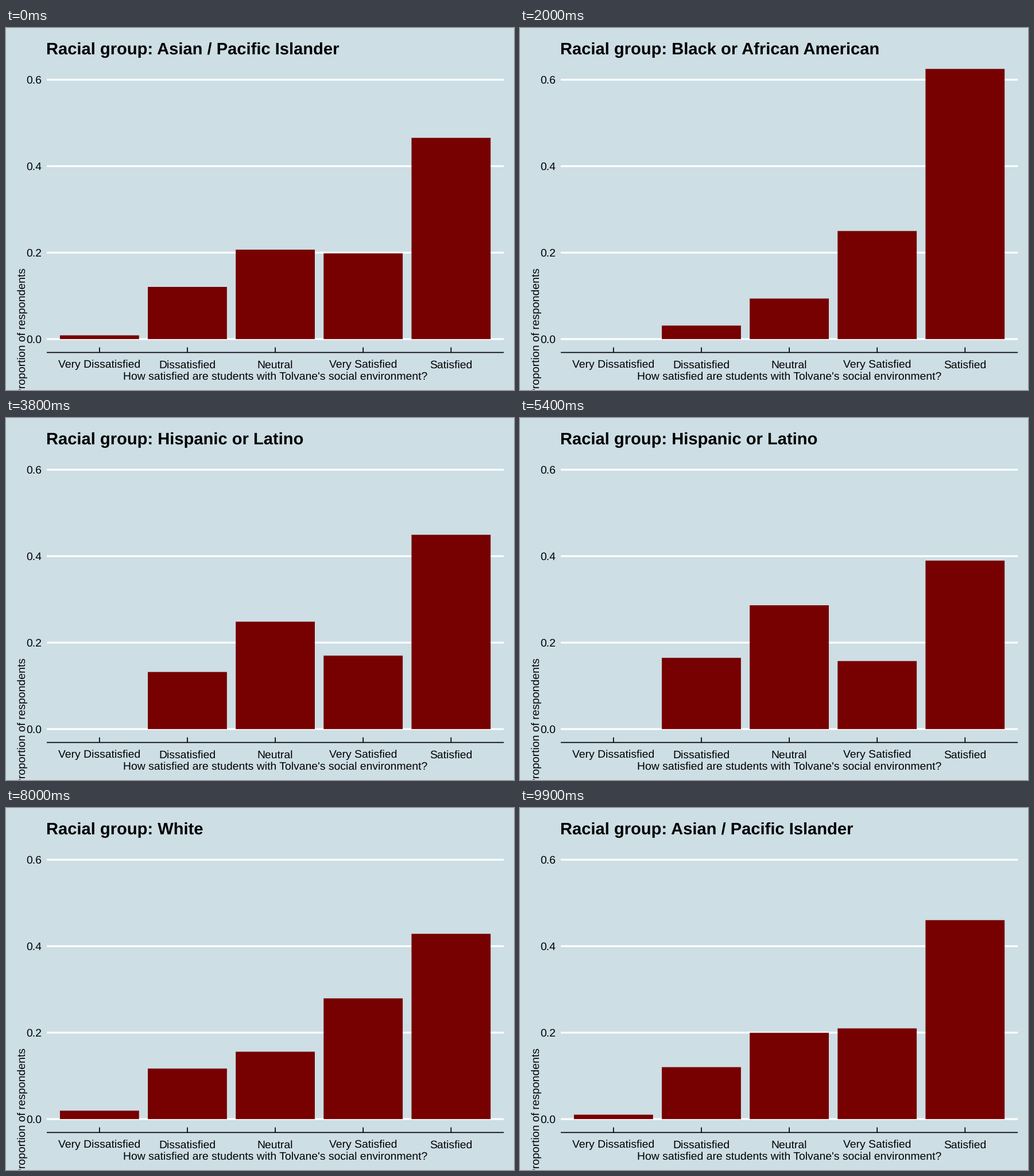
These frames come from a looping animation (885x632 px, 10 s). A matplotlib script:

```python
import matplotlib.pyplot as plt
import numpy as np
from matplotlib.animation import FuncAnimation
from matplotlib.patches import Rectangle

W, H, DPI = 885, 632, 64
SKY, RED = "#cddee5", "#770000"

LEFT, RIGHT = 71, 867.2
ZERO, UNIT = 543.1, 754.7          # pixel row of 0.0, pixels per 1.0
FLOOR = 566.5
STEP = (RIGHT - LEFT) / 5.2
CENTERS = LEFT + STEP * (0.6 + np.arange(5))

ANSWERS = ["Very Dissatisfied", "Dissatisfied", "Neutral",
           "Very Satisfied", "Satisfied"]
GROUPS = ["Asian / Pacific Islander", "Black or African American",
          "Hispanic or Latino", "Other", "White"]
COUNTS = np.array([
    [1, 14, 24, 23, 54],
    [0, 1, 3, 8, 20],
    [0, 5, 9, 4, 11],
    [1, 10, 12, 23, 38],
    [3, 18, 24, 43, 66],
])
SHARES = COUNTS / COUNTS.sum(axis=1, keepdims=True)

PER_GROUP, LAST_HOLD, MOVES = 20, 13, 7

plt.rcParams["font.family"] = "Liberation Sans"
plt.rcParams["text.hinting"] = "none"

fig = plt.figure(figsize=(W / DPI, H / DPI), dpi=DPI, facecolor=SKY)
ax = fig.add_axes([0, 0, 1, 1])
ax.set_xlim(0, W)
ax.set_ylim(H, 0)
ax.axis("off")


def pt(px):
    return px * 72 / DPI


def line(x, y, color, width, z):
    ax.plot(x, y, color=color, lw=pt(width), solid_capstyle="butt",
            snap=False, zorder=z)


def label(x, y, text, ha="center", size=19.4, **kw):
    return ax.text(x, y, text, ha=ha, va="baseline", fontsize=pt(size),
                   color="black", zorder=4, **kw)


for value in (0, 0.2, 0.4, 0.6):
    y = ZERO - value * UNIT
    line([LEFT, RIGHT], [y, y], "white", 3.2, 1)
    label(62, y + 7, f"{value:.1f}", ha="right")

line([LEFT, RIGHT], [FLOOR, FLOOR], "black", 1.7, 3)
for x, answer in zip(CENTERS, ANSWERS):
    line([x, x], [557.6, FLOOR], "black", 1.7, 3)
    label(x, 593.5, answer)

label(469, 613.7, "How satisfied are students with Tolvane's social environment?")
label(34, 418.5, "Proportion of respondents", ha="right",
      rotation=90, rotation_mode="anchor")
title = label(70.3, 45.6, "", ha="left", size=29.1, weight="bold")

bars = [ax.add_patch(Rectangle((x - 0.45 * STEP, ZERO), 0.9 * STEP, 0,
                               facecolor=RED, lw=0, snap=False, zorder=2))
        for x in CENTERS]


def draw(frame):
    now, step = divmod(frame, PER_GROUP)
    after = (now + 1) % len(GROUPS)
    t = max(0, step - LAST_HOLD) / MOVES
    title.set_text("Racial group: " + GROUPS[now if t < 0.5 else after])
    for bar, a, b in zip(bars, SHARES[now], SHARES[after]):
        # an empty category has no bar to grow from or shrink into
        bar.set_visible(a > 0 if t == 0 else a > 0 and b > 0)
        bar.set_height(-UNIT * (a + (b - a) * t))
    return [title, *bars]


anim = FuncAnimation(fig, draw, frames=PER_GROUP * len(GROUPS), interval=100,
                     init_func=lambda: draw(0), repeat=True, repeat_delay=0)
plt.show()
```
